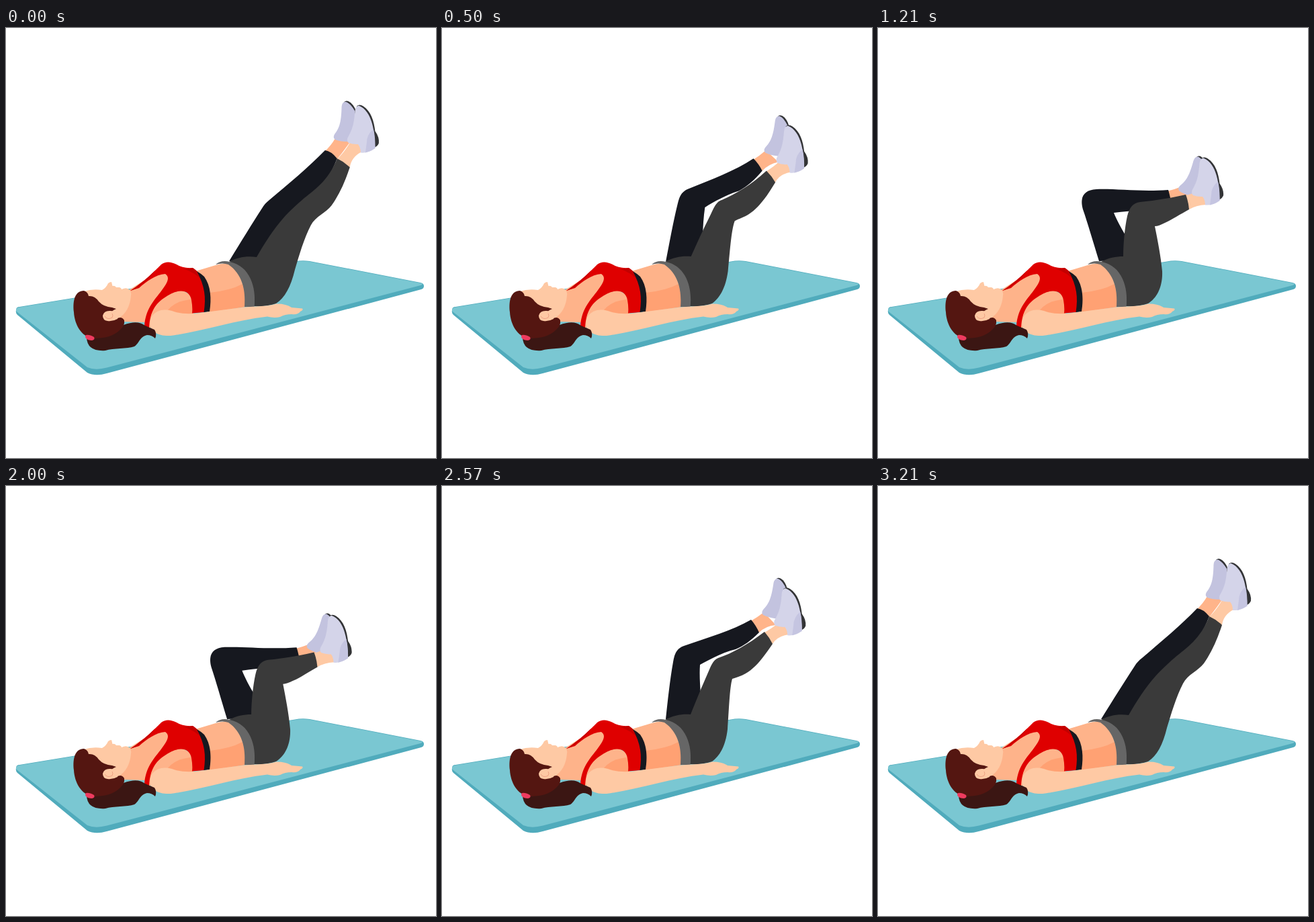
Animation of 640x640 px, one loop 3570 ms. Source, as an HTML page:

```html
<!DOCTYPE html>
<html lang="en">
<head>
<meta charset="utf-8">
<title>Leg raise on a mat</title>
<style>
  html, body { margin: 0; width: 100%; height: 100%; overflow: hidden; background: #fff; }
  svg { display: block; width: 100%; height: 100%; }
</style>
</head>
<body>
<svg viewBox="0 0 640 640">
  <g id="mat">
    <path fill="#50abbc" d="M15 420Q15 415 20 415L430 347.500Q440 345.500 452 347L617 379Q622 380 622 384Q622 388 618 389L150 514Q133 519 121 513L17 427Q14 424 15 420Z"/>
    <path fill="#7ac7d2" d="M15 420Q15 416 20 415.700L430 348.200Q440 346.200 452 347.700L617 379.700Q623 381 617 383L150 505.500Q133 510 121 505L17 423Q15 422 15 420Z"/>
  </g>

  <g id="backLeg">
    <path id="backAnkle" fill="#ffb48a"/>
    <path id="backPants" fill="#16181f"/>
    <g id="backShoe">
      <path fill="#333436" d="M503 110Q507 106 513 111Q520 117 522 128L514 130Z"/>
      <path fill="#c3c3df" d="M505 109.500Q500 110 499.500 117C499 138 497 148 489 158Q486 163 490 166Q498 169 510 169L519 148V123Q512 111 505 109.500Z"/>
    </g>
  </g>

  <g id="frontLeg">
    <path id="frontAnkle" fill="#fec9a4"/>
    <path id="frontPants" fill="#3a3a3a"/>
    <g id="frontShoe">
      <path fill="#333436" d="M522 116Q526 112 532 116C543 123 548 138 549.500 153Q556 162 555 171Q553 176 547 178L535 140Z"/>
      <path fill="#d4d4e9" d="M525 115Q520 116 519.500 123C518 144 515 152 508.500 163Q507 168 510 170.500Q517 173 524 172.500Q528 177 528 185Q540 186 549.500 178.500C549 156 546 123 525 115Z"/>
      <path fill="#c5c5e1" d="M547 150Q537 158 537 170L535 185Q543 183 549.500 178.500Q550 162 547 150Z"/>
    </g>
  </g>

  <g id="torso">
    <path fill="#feb38a" d="M282 362L312 353Q325 349 333 352C350 365 357 388 356 415L300 424Z"/>
    <path fill="#ffa173" d="M303 394Q333 391 352 381Q357 398 356 415L301 423Z"/>
    <path fill="#666" d="M312 352Q320 345 333 348C363 354 373 386 369.500 415H355C357 388 351 366 331 352Q322 349 312 352Z"/>
    <path fill="#feb38a" d="M183 390L205 376L243 362L262 390L279 400V425L212 447L207 438L175 437L165 430Z"/>
    <path fill="#ffa173" d="M238 424Q250 405 278 404V426Z"/>
    <path fill="#df0000" d="M185 391C206 377 222 361 231 352Q240 345 254 352Q263 358 278 357C292 366 302 392 295 423L277 424.500Q278 416 276 405C273 387 253 388 235 402C219 413 214 427 213 447Q208 447 206 443C208 419 219 407 230 393C240 380 245 371 237 366C223 367 209 377 198 387Z"/>
    <path fill="#c40000" d="M262 357.500Q270 359 278 357Q289 364 294 378Q283 364 262 357.500Z"/>
    <path fill="#c40000" d="M185 391Q206 378 222 361Q214 373 200 383Q192 389 185 391Z"/>
    <path fill="#16181f" d="M284 362Q291 366 295 370C305 384 306 403 303 422L294.500 423C298 401 296 384 284 362Z"/>
  </g>

  <path id="arm" fill="#fec9a4" d="M217 429Q227 416 247 421Q262 427 285 424.500L355 415.500L380 414Q394 413 402 410.500Q416 410 425 416L441 417.500Q443 420 438 422Q435 427 425 426Q415 426 408 430Q399 432 389 429.500C340 435 290 452 245 458C220 459 209 446 217 429Z"/>

  <g id="head">
    <path fill="#3b1613" d="M120 461Q146 465 175 442Q196 434 207 443L221 449Q225 455 222 462Q217 457 210 457C199 459 198 470 191 474C180 478 160 476 148 480Q121 482 120 461Z"/>
    <path fill="#fec9a4" d="M116 392Q128 388 143 390Q149 387 152 380Q154 378 157 378L158.500 384Q162 383 164 386L169 386Q172 387 172 389Q180 385 184 390Q187 394 186 398C185 413 179 426 166 433L140 438Z"/>
    <path fill="#541611" d="M116 391Q122 393 123 399Q132 398 138 407Q145 415 158 416L164 418Q156 421 154 427L164 433Q172 428 176 435Q177 443 171 448C161 459 146 462 130 462C112 460 102 441 101 423C99 405 103 391 116 391Z"/>
    <path fill="#fec9a4" d="M144 428Q146 420 156 421L168 423L166 433Q159 437 151 436Q144 435 144 428Z"/>
    <path fill="none" stroke="#eda184" d="M147 429Q151 435 158 431Q160 428 158 425"/>
    <path fill="#ee3b5f" d="M119 457Q124 456 131 460Q133 464 128 465Q122 465 119 462Q117 459 119 457Z"/>
  </g>
</svg>
<script>
const LOOP = 3570, STEP = 71.4, TRAVEL = 18, BENT = 17, RISE = 27;
const el = id => document.getElementById(id);

// Each limb has three poses with matching points: straight, halfway, bent.
const limbs = {
  backPants: [
    "M332 347C350 318 367 291 382 268C385 263 388 260 393 256C420 233 452 206 475 182Q484 183 493 194C484 217 474 236 455 258C448 266 440 273 433 281C425 290 412 305 402 320L375 345Z",
    "M333 347C336 320 339 290 344 262C346 250 349 242 360 238C395 226 432 215 460 199Q467 207 472 218C460 230 449 238 437 243C420 247 400 257 384 266C383 280 384 295 385 310L372 345Z",
    "M329 347C320 318 312 290 305 270C300 252 306 241 325 240C355 239 390 244 432 241Q434 247 437 262C422 268 405 270 395 271C380 272 365 273 351 275C355 285 362 298 368 308L375 345Z"
  ],
  backAnkle: [
    "M490 164Q484 175 473 185L493 195Q502 184 513 168Z",
    "M479 188Q470 195 458 202L472 218Q482 208 497 207Z",
    "M452 236Q442 240 430 243L437 262Q448 254 466 256Z"
  ],
  frontPants: [
    "M332 348C345 341 358 339 373 341C385 320 398 300 413 283C418 277 424 272 430 266C452 244 477 235 493 194Q504 199 512 207C505 228 497 247 485 264C477 275 461 280 454 294C444 313 436 340 430 360C424 385 415 402 402 410Q388 415 369 414Q373 370 332 348Z",
    "M332 348C345 341 358 339 370 340C378 320 387 298 395 280C400 269 403 259 411 256C432 249 455 236 480 217Q487 225 492 235C481 251 468 270 452 279C445 283 438 285 432 287C428 300 427 335 425 362C422 388 413 402 402 410Q388 415 369 414Q373 370 332 348Z",
    "M332 348C343 342 354 340 365 340C365 322 367 298 371 280C374 267 380 260 390 259C411 257 436 253 458 248Q462 258 463 270C450 277 438 285 427 290C421 293 416 295 412 295C416 315 421 340 423 362C424 385 415 402 402 410Q388 415 369 414Q373 370 332 348Z"
  ],
  frontAnkle: [
    "M513 168Q506 182 492 196L512 207Q514 192 529 184L526 170Z",
    "M499 205Q491 212 478 219L492 235Q499 223 517 221L512 207Z",
    "M472 245Q466 247 456 250L463 270Q473 264 488 263L486 247Z"
  ]
};

const ease = u => (1 - Math.cos(Math.PI * u)) / 2;
const clamp = u => Math.max(0, Math.min(1, u));

// Parabola through three values at p = 0, 0.5 and 1.
const arc = (a, b, c, p) =>
  a * (1 - p) * (1 - 2 * p) + b * 4 * p * (1 - p) + c * p * (2 * p - 1);

const NUM = /\d+(\.\d+)?/g;
const poses = Object.entries(limbs).map(([id, [a, b, c]]) =>
  ({ node: el(id), a, b: b.match(NUM), c: c.match(NUM) }));

function bend(t) {
  const k = Math.floor((t + 5) / STEP);
  if (k <= BENT) return ease((k + 1) / TRAVEL);
  return ease(clamp((RISE + TRAVEL - k) / TRAVEL));
}

function draw(t) {
  const p = bend(t);
  for (const { node, a, b, c } of poses) {
    let i = 0;
    node.setAttribute("d", a.replace(NUM, n => {
      const v = arc(+n, +b[i], +c[i], p).toFixed(2);
      i++;
      return v;
    }));
  }
  el("backShoe").setAttribute("transform",
    `translate(${arc(0, -5, -28, p)} ${arc(0, 28.5, 82.5, p)}) rotate(${14 * p} 507 108)`);
  el("frontShoe").setAttribute("transform",
    `translate(${arc(0, -13.8, -41, p)} ${arc(0, 37.3, 78.5, p)})`);
}

function tick(now) {
  draw(now % LOOP);
  requestAnimationFrame(tick);
}
draw(0);
requestAnimationFrame(tick);
</script>
</body>
</html>
```
